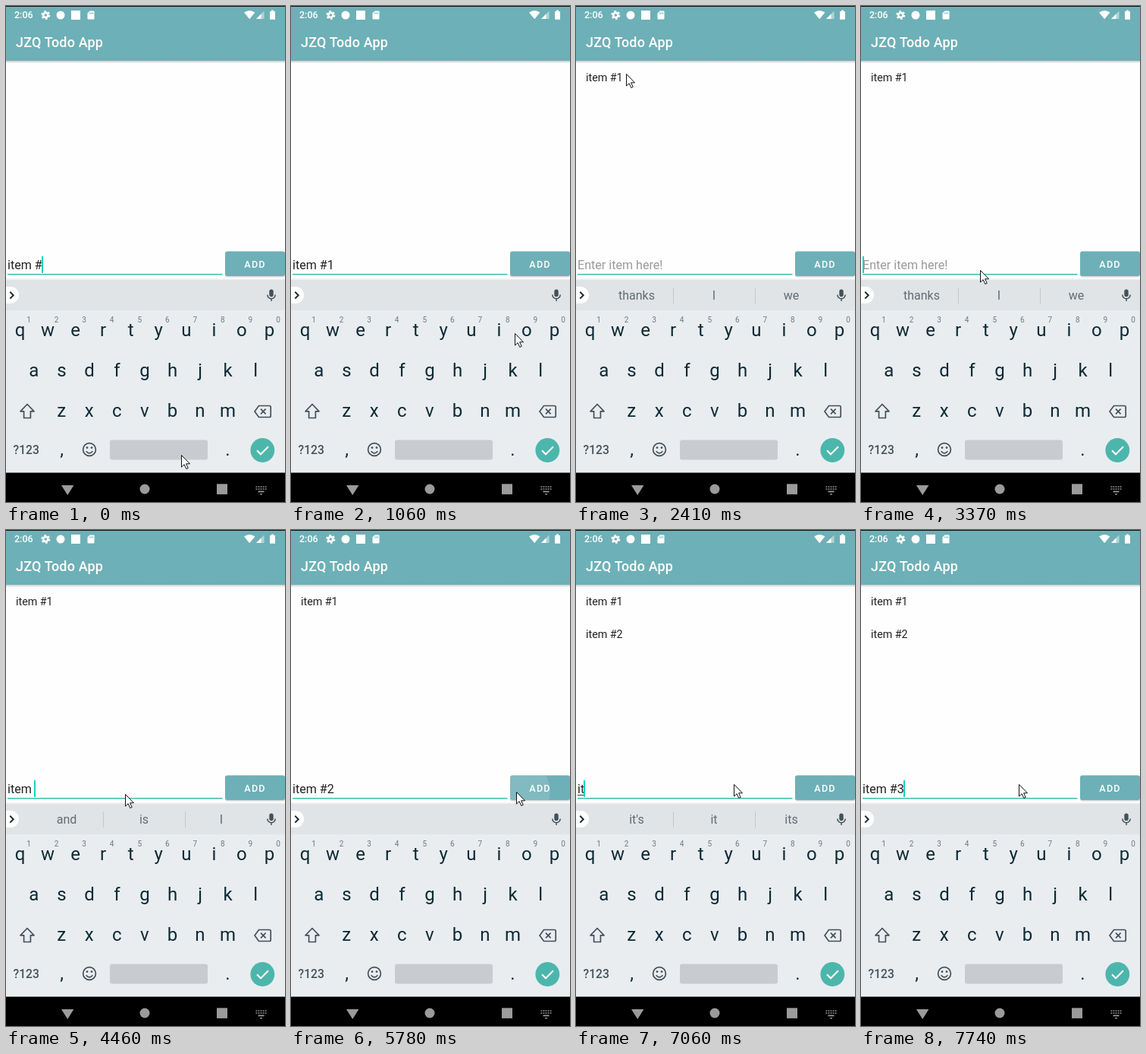
Write an HTML page that moves like this. It is 368 px wide and 652 px high and loops after 8 s.

```html
<!DOCTYPE html>
<html lang="en">
<head>
<meta charset="utf-8">
<title>Todo App</title>
<style>
  html, body { margin: 0; width: 100%; height: 100%; overflow: hidden; background: #fefefe; }
  svg { display: block; width: 100vw; height: 100vh; font-family: Roboto, sans-serif; }
  text { white-space: pre; }
  .key { font-size: 24px; fill: #0d2a34; text-anchor: middle; }
  .num { font-size: 10px; fill: #6c7a80; text-anchor: middle; }
  .hint { font-size: 16px; fill: #626c72; text-anchor: middle; }
  .item { font-size: 14.3px; fill: #222; }
  .line { fill: none; stroke: #435158; stroke-width: 1.7; }
  .bold { font-weight: 500; fill: #fff; }
</style>
</head>
<body>
<svg id="stage" viewBox="0 0 368 652">
  <defs>
    <linearGradient id="shade" x2="0" y2="1">
      <stop stop-color="#000" stop-opacity=".2"/>
      <stop offset="1" stop-color="#000" stop-opacity="0"/>
    </linearGradient>
    <clipPath id="btn"><rect x="289" y="322.5" width="79" height="32.5" rx="3"/></clipPath>
  </defs>
  <rect width="368" height="652" fill="#fefefe"/>

  <!-- status and title bar -->
  <rect width="368" height="72" fill="#6eb0b7"/>
  <rect width="368" height="1" fill="#111"/>
  <rect y="72" width="368" height="3.5" fill="url(#shade)"/>
  <text class="bold" x="11" y="16.3" font-size="12.5">2:06</text>
  <g fill="#fff">
    <circle cx="52.3" cy="12" r="3.1" fill="none" stroke="#fff" stroke-width="2.6"/>
    <circle cx="52.3" cy="12" r="5" fill="none" stroke="#fff" stroke-width="2" stroke-dasharray="2.6 2.636"/>
    <circle cx="72" cy="12" r="5.5"/>
    <rect x="86" y="6" width="12" height="12"/>
    <path d="M110.5 6.5h5q1 0 1 1v9q0 1-1 1h-7q-1 0-1-1v-7z"/>
    <path d="M110.7 8.3v2.4M112.6 8.3v2.4M114.5 8.3v2.4" stroke="#6eb0b7" stroke-width=".9"/>
    <path d="M314 8.6q7.2-5.4 14.4 0L321.2 17.3z"/>
    <path d="M330 17L340.5 6.5V17z" opacity=".45"/>
    <path d="M330 17l6.5-6.5V17z"/>
    <path d="M348 7h2V5.6h3V7h2v10.8h-7z"/>
  </g>
  <text class="bold" x="13" y="54" font-size="17.9" letter-spacing=".22">JZQ Todo App</text>

  <!-- list and input row -->
  <text class="item" x="13" y="99.3">item #1</text>
  <text class="item" x="13" y="142.3">item #2</text>
  <text id="field" x="2" y="346" font-size="16.1"></text>
  <rect id="compose" x="2" y="348" height="1" fill="#333"/>
  <rect x="2" y="352" width="283.5" height="1.5" fill="#3fbcb1"/>
  <rect id="caret" y="329" width="2" height="22" fill="#14d3c1"/>
  <rect x="289" y="324" width="79" height="32.5" rx="3" fill="#000" opacity=".16"/>
  <g clip-path="url(#btn)">
    <rect x="289" y="322" width="79" height="34" fill="#6eb0b7"/>
    <circle id="ripple" fill="#fff"/>
  </g>
  <text class="bold" x="314.3" y="343.5" font-size="12.6" letter-spacing="1.2">ADD</text>

  <!-- keyboard -->
  <rect y="358.5" width="368" height="2" fill="#eff0f1"/>
  <rect y="360" width="368" height="41" fill="#e1e4e7"/>
  <rect y="400" width="368" height="214" fill="#e9edf0"/>
  <rect x="-12" y="369" width="29" height="22" rx="11" fill="#fff"/>
  <path class="line" d="M5.3 375.8l4.4 4.4-4.4 4.4" style="stroke:#1d2b31;stroke-width:2"/>
  <rect x="347.3" y="372.5" width="5.4" height="9.8" rx="2.7" fill="#435158"/>
  <path class="line" d="M344.8 379.5a5.2 5.2 0 0 0 10.4 0M350 384.7v3.3" style="stroke-width:1.5"/>
  <path id="split" d="M128.5 370v21M236.5 370v21" stroke="#c3c8cb"/>
  <text class="hint" x="80" y="386"></text>
  <text class="hint" x="182" y="386"></text>
  <text class="hint" x="284" y="386"></text>
  <g id="keys"></g>
  <path class="line" d="M28 523.5l9 9.3h-4.6v8.7h-8.8v-8.7H19z" stroke-linejoin="round"/>
  <path class="line" d="M333.5 525.5h14q1.7 0 1.7 1.7v11.6q0 1.7-1.7 1.7h-14l-5.5-7.5zM336 529.7l6.6 6.6m0-6.6l-6.6 6.6"/>
  <text x="9.5" y="589" font-size="15.7" font-weight="500" fill="#46545b">?123</text>
  <circle class="line" cx="110" cy="583" r="8.4"/>
  <path class="line" d="M105.6 585.3q4.4 5 8.8 0"/>
  <circle cx="107" cy="580.6" r="1.4" fill="#435158"/>
  <circle cx="113" cy="580.6" r="1.4" fill="#435158"/>
  <rect x="137" y="570.5" width="129" height="26" rx="3" fill="#c8ccd0"/>
  <circle cx="338.3" cy="584" r="15.9" fill="#4db6ac"/>
  <path d="M331 584.3l5 5 10-10" fill="none" stroke="#fff" stroke-width="2"/>

  <!-- navigation bar -->
  <rect y="613.5" width="368" height="38.5"/>
  <g fill="#9b9b9b">
    <path d="M73 630h16.4L81.2 643z"/>
    <circle cx="183" cy="635" r="6.5"/>
    <rect x="278" y="628.3" width="14" height="13.6"/>
    <path d="M329.5 632h14M329.5 635h14" stroke="#9b9b9b" stroke-width="1.7" stroke-dasharray="1.8 1.25"/>
    <path d="M332.5 637.5h8v1.7h-8zM334.5 641h4l-2 2z"/>
  </g>

  <path id="mouse" d="M.5.5v15.6l3.6-3.4 2.7 5.8 2.4-1.1-2.6-5.6h4.9z" fill="#fff" stroke="#111"/>
</svg>
<script>
const LOOP = 8000;
const $ = id => document.getElementById(id);
const set = (el, attrs) => { for (const k in attrs) el.setAttribute(k, attrs[k]); };
const show = (el, on) => el.setAttribute("visibility", on ? "visible" : "hidden");
const items = document.querySelectorAll(".item");
const hints = document.querySelectorAll(".hint");

function addKey(cls, x, y, label) {
  const el = document.createElementNS("http://www.w3.org/2000/svg", "text");
  set(el, { class: cls, x, y });
  el.textContent = label;
  $("keys").append(el);
}
const row = (cls, chars, x, y) =>
  [...chars].forEach((c, i) => addKey(cls, x + i * 36.55, y, c));
row("key", "qwertyuiop", 18.5, 434);
row("num", "1234567890", 30, 416);
row("key", "asdfghjkl", 36.8, 487);
row("key", "zxcvbnm", 73.2, 540);
addKey("key", 73.5, 591, ",");
addKey("key", 292.3, 591, ".");

// Screen refreshes: first time, last time, count
const bursts = [[0, 0, 1], [300, 300, 1], [700, 1600, 8], [1740, 1740, 1], [1870, 2860, 8],
  [2980, 3370, 4], [3770, 4190, 4], [4460, 4960, 3], [5360, 5780, 4], [5930, 6320, 4],
  [6820, 7310, 4], [7590, 7740, 2]];
const ticks = bursts.flatMap(([a, b, n]) =>
  Array.from({ length: n }, (_, i) => n > 1 ? a + (b - a) * i / (n - 1) : a));

const typing = [[0, "item #"], [300, "item #1"], [1340, ""],
  [3770, "i"], [3910, "it"], [4050, "ite"], [4190, "item"], [4460, "item "],
  [4710, "item #"], [4960, "item #2"], [5810, ""],
  [6820, "i"], [6983, "it"], [7146, "item"], [7310, "item "], [7590, "item #"], [7740, "item #3"]];

const words = {
  "": ["thanks", "I", "we"],
  "i": ["I", "I'm", "it"],
  "it": ["it's", "it", "its"],
  "ite": ["item", "items", "itemized"],
  "item": ["items", "item", "itemized"],
  "item ": ["and", "is", "I"]
};

// Pointer: time, x, y
const path = [[0, 231, 590], [600, 231, 590], [1200, 331, 340], [1600, 331, 340],
  [1740, 293, 305], [2150, 66, 89], [2440, 66, 89], [2860, 100, 169], [3370, 157, 347],
  [5250, 157, 347], [5640, 297, 344], [5800, 297, 344], [6320, 208, 334], [LOOP, 208, 334]];
const presses = [[1210, 331, 340], [5650, 297, 344]];

function pointer(t) {
  const i = path.findIndex(p => p[0] > t);
  const [a, b] = [path[i - 1], path[i]];
  const u = (t - a[0]) / (b[0] - a[0]);
  const e = u * u * (3 - 2 * u);
  return [a[1] + (b[1] - a[1]) * e, a[2] + (b[2] - a[2]) * e];
}

function draw(now) {
  const t = ticks.findLast(k => k <= now);
  const [since, text] = typing.findLast(e => e[0] <= t);

  const field = $("field");
  field.textContent = text || "Enter item here!";
  field.setAttribute("fill", text ? "#222" : "#999");
  const width = text ? field.getComputedTextLength() : 0;
  set($("caret"), { x: Math.max(2, Math.round(1 + width)) });
  show($("caret"), (t - since) % 1000 < 500);
  set($("compose"), { width });
  show($("compose"), /^\w+$/.test(text));

  const list = words[text];
  hints.forEach((el, i) => el.textContent = list ? list[i] : "");
  show($("split"), list);

  const added = typing.filter(e => !e[1] && e[0] <= t).length;
  items.forEach((el, i) => show(el, i < added));

  const press = presses.find(p => t >= p[0] && t < p[0] + 380);
  show($("ripple"), press);
  if (press) {
    const age = t - press[0];
    set($("ripple"), { cx: press[1], cy: press[2], r: 16 + age * .22,
      opacity: .13 * Math.min(1, (380 - age) / 220) });
  }

  const [x, y] = pointer(t).map(Math.round);
  set($("mouse"), { transform: `translate(${x} ${y})` });
}

function frame() {
  draw(performance.now() % LOOP);
  requestAnimationFrame(frame);
}
frame();
</script>
</body>
</html>
```
